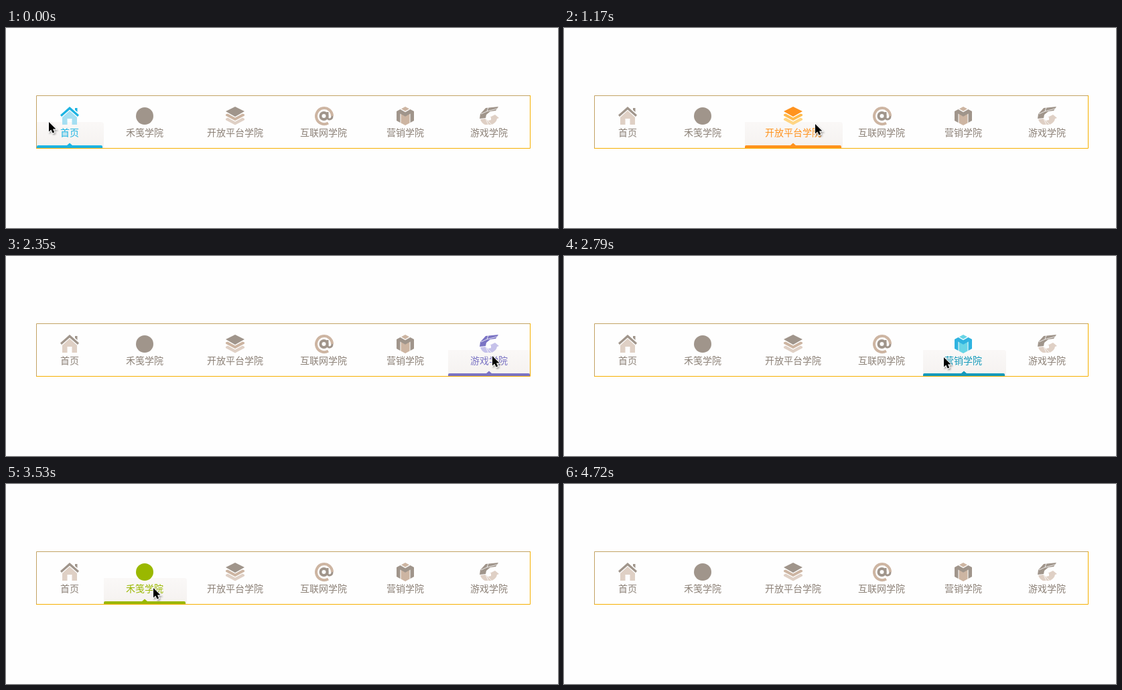
Animation of 824 by 300 pixels, one loop 5.17 s. Source, as an HTML page:

```html
<!DOCTYPE html>
<html lang="zh-CN">
<head>
<meta charset="utf-8">
<title>导航栏</title>
<style>
html, body { margin: 0; width: 100%; height: 100%; overflow: hidden; background: #fefefe; }
svg { display: block; }
text { font: 14px "Noto Sans CJK SC", "Noto Sans CJK", sans-serif; fill: var(--text); }
.tab { --dark: #a0958b; --mid: #cdb5a2; --light: #dfd0c5; --text: #8c8177; }
.tab.on { --dark: var(--c1); --mid: var(--c2); --light: var(--c3); --text: var(--c4); }
.hover { visibility: hidden; }
.on .hover { visibility: visible; }
.dark { fill: var(--dark); }
.mid { fill: var(--mid); }
.light { fill: var(--light); }
.bar { fill: var(--c4); }
.ring { fill: none; stroke-width: 4; }
</style>
</head>
<body>
<svg width="824" height="300" viewBox="0 0 824 300">
  <defs>
    <linearGradient id="glow" x2="0" y2="1">
      <stop stop-color="#faf8f7"/><stop offset="1" stop-color="#f5f2f0"/>
    </linearGradient>
    <filter id="shadow" x="-50%" y="-50%" width="200%" height="200%">
      <feDropShadow dx="1.5" dy="2" stdDeviation="1" flood-opacity=".35"/>
    </filter>
  </defs>
  <g id="nav"></g>
  <g fill="none">
    <path d="M45.5 181V101.5H783" stroke="#c2a263"/>
    <path d="M45 180.5H782.5V101" stroke="#f6b000"/>
  </g>
  <path id="cursor" d="M0 0V14.5L3.3 11.6L5.6 16.6L8.2 15.5L6 10.6H10.5Z"
    stroke="#fff" paint-order="stroke" stroke-width="1.6" filter="url(#shadow)"/>
</svg>
<script>
const LOOP = 5170;
const shape = (cls, d) => `<path class="${cls}" d="${d}"/>`;

// Icons live in a 28 by 28 box.
const icons = {
  home: shape('light', 'M14 6L25 16V27H17.5V18H10.5V27H3V16Z') +
    shape('dark', 'M14 0L28 12.5L26 15L14 4.5L2 15L0 12.5ZM22 2H25.5V8L22 5Z'),
  disc: '<circle class="dark" cx="14" cy="14" r="13"/>',
  layers: shape('dark', 'M14 0L28 7L14 15L0 7Z') +
    shape('mid', 'M0 11.5L3 10.5L14 16.5L25 10.5L28 11.5V13.5L14 21L0 13.5Z') +
    shape('light', 'M0 18L3 16.5L14 22.5L25 16.5L28 18V20L14 27.5L0 20Z'),
  at: '<path class="ring" stroke="var(--mid)" d="M20 24.5A12 12 0 1 1 26 14"/>' +
    '<circle class="ring" stroke="var(--dark)" cx="13.5" cy="14" r="5"/>' +
    '<path class="ring" stroke="var(--dark)" d="M19 8V16.5Q19.5 19 22 19Q26 18.5 26 14" style="stroke-width:3"/>',
  cube: shape('mid', 'M14 0L20 3.2L14 6.7L8 3.2ZM14 13L20.5 9.5V24.5L14 28L7.5 24.5V9.5Z') +
    shape('dark', 'M6.5 4L14 8.3L21.5 4L27 7V21L21.5 24V10.5L14 14.7L6.5 10.5V24L1 21V7Z'),
  swirl: shape('dark', 'M1 11L9 2L28 0L24 6L16 7L10 12L9 17L0 18Z') +
    '<path d="M2 11L11 7L26 3M11 7L13 1" fill="none" stroke="#fefefe" stroke-width=".8"/>' +
    shape('light', 'M1 19L9 18L12 21L17 20V16H15L23 12L29 17L26 18Q25 24 18 27L8 27Q3 25 1 19Z') +
    '<path d="M9 18L13 27M12 21L18 27" stroke="#fefefe" stroke-width=".8"/>'
};

// label, left, width, text x, icon x, icon, colours (dark, mid, light, text)
const tabs = [
  ['首页', 46, 98, 81, 81, 'home', '#1cb3e2 #6dcdea #a5dff2 #1cb3e2'],
  ['禾笺学院', 146, 122, 179, 193, 'disc', '#9ab800 #d5ec3a #d5ec3a #9ab800'],
  ['开放平台学院', 270, 144, 300, 328, 'layers', '#ff931f #ffba4c #ffd583 #ff931f'],
  ['互联网学院', 416, 118, 439, 461, 'at', '#e55b4d #f2988d #f7bdb5 #e55b4d'],
  ['营销学院', 536, 122, 568, 582, 'cube', '#2fb3e0 #69d5e6 #a0e3ef #159abb'],
  ['游戏学院', 660, 122, 693, 707, 'swirl', '#7b74c4 #aaa4df #c6c2ea #7b74c4']
];

document.getElementById('nav').innerHTML = tabs.map(([label, x, w, tx, ix, icon, colours]) => {
  const vars = colours.split(' ').map((c, i) => `--c${i + 1}:${c}`).join(';');
  const mid = x + w / 2;
  return `<g class="tab" style="${vars}">
    <g class="hover">
      <path d="M${x} 141H${x + w - 2}q4 0 4 4V180H${x}Z" fill="url(#glow)"/>
      <path class="bar" d="M${x} 180V178q0-2 2-2H${mid - 4}l4-3.5l4 3.5H${x + w - 2}q2 0 2 2V180Z"/>
    </g>
    <g transform="translate(${ix} 118)">${icons[icon]}</g>
    <text x="${tx}" y="162">${label}</text>
  </g>`;
}).join('');

// Pointer stops: time, x, y
const stops = [
  [0, 64, 141], [150, 76, 141], [300, 105, 141], [440, 145, 141], [590, 190, 141],
  [740, 234, 141], [880, 282, 142], [1020, 330, 143], [1170, 375, 144],
  [1320, 432, 144], [1470, 496, 145], [1610, 556, 145], [1760, 609, 146],
  [1910, 658, 147], [2060, 695, 148], [2200, 718, 149], [2350, 726, 150],
  [2500, 700, 151], [2640, 630, 152], [2790, 567, 152],
  [3090, 520, 153], [3240, 425, 154], [3390, 320, 155], [3530, 220, 156],
  [3680, 145, 155], [3830, 98, 153], [3980, 78, 151],
  [4280, 142, 162], [4430, 400, 216], [4570, 707, 286], [4720, 720, 340]
];

const cursor = document.getElementById('cursor');
const groups = document.querySelectorAll('.tab');

function draw(now) {
  const t = now % LOOP;
  const [, x, y] = stops.findLast(s => s[0] <= t);
  const active = y < 181 ? tabs.findLastIndex(tab => tab[1] <= x) : -1;
  groups.forEach((g, i) => g.classList.toggle('on', i === active));
  cursor.setAttribute('transform', `translate(${x} ${y})`);
}

const start = performance.now();
function tick() {
  draw(performance.now() - start);
  requestAnimationFrame(tick);
}
tick();
</script>
</body>
</html>
```
